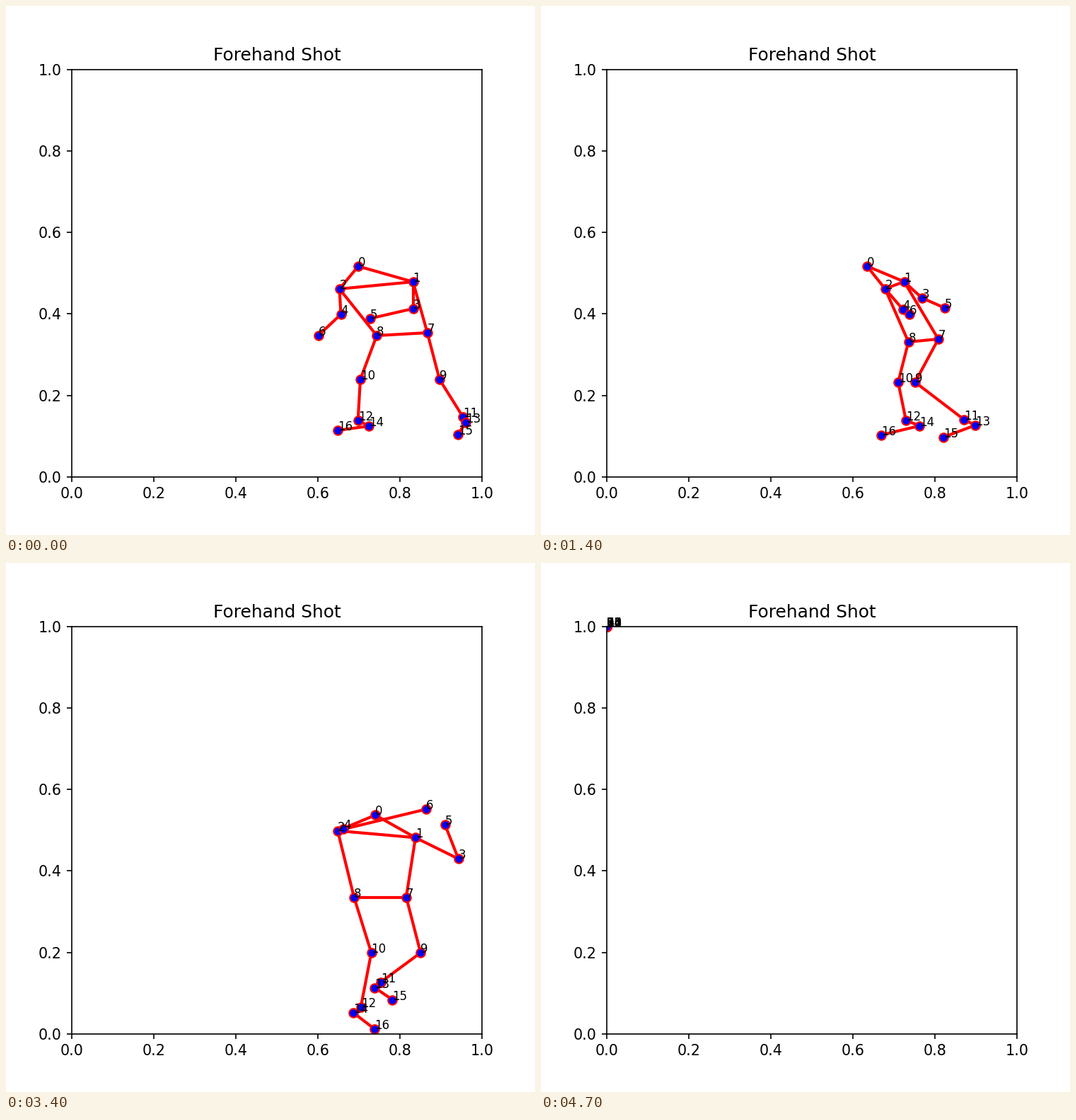
A matplotlib script for the animation above (6100 ms loop, 748 by 748 pixels).

```python
import numpy as np
import matplotlib.pyplot as plt
from matplotlib.animation import FuncAnimation

SIZE = 748
STEPS, STEP_MS = 61, 100
LOST_STEP = 47  # from here on every joint rests in the top-left corner
MOMENTS = np.array([0, 5, 14, 22, 29, 39])  # key moments of the stroke
BONES = [(0, 1), (0, 2), (1, 2), (1, 3), (3, 5), (2, 4), (4, 6),
         (1, 7), (2, 8), (7, 8), (7, 9), (9, 11), (11, 13), (13, 15),
         (8, 10), (10, 12), (12, 14), (14, 16)]
t = np.arange(LOST_STEP)


def ease(start, end):
    u = np.clip((t - start) / (end - start), 0, 1)
    return u * u * (3 - 2 * u)


def bump(center, width):
    return np.exp(-0.5 * ((t - center) / width) ** 2)


def track(*values):
    """Smooth curve through one value per key moment, then held."""
    values = np.array(values)
    slopes = np.gradient(values, MOMENTS)
    now = np.minimum(t, MOMENTS[-1])
    i = np.clip(np.searchsorted(MOMENTS, now, side="right") - 1, 0, len(MOMENTS) - 2)
    span = MOMENTS[i + 1] - MOMENTS[i]
    u = (now - MOMENTS[i]) / span
    blend = u * u * (3 - 2 * u)
    return (values[i] * (1 - blend) + values[i + 1] * blend
            + span * u * (1 - u) * (slopes[i] * (1 - u) - slopes[i + 1] * u))


def pair(center, width, tilt):
    """Right and left joint on either side of a center."""
    half = (width - 1j * tilt) / 2
    return center + half, center - half


def foot(heel, reach, drop):
    """Ankle, heel and toe; the toe lies reach across and drop below the heel."""
    return heel + 0.35 * reach - 8j, heel, heel + reach + 1j * drop


def stroke():
    """Stage position of all 17 joints as x + iy, one row per step."""
    width = track(104, 64, 27, 107, 124, 87)
    chest = 524 - 24 * bump(14, 5) + 1j * (395 - 19 * bump(29, 5))
    hips = (560 - 31 * ease(0, 24)
            + 1j * (473 - 9 * bump(0, 4) - 8 * bump(29, 4) + 10 * ease(31, 39)))
    nose = chest - 25 - 15 * bump(16, 6) + 35 * ease(26, 39) - 27j
    shoulder_r, shoulder_l = pair(chest, width, 10 - 25 * ease(22, 39))
    hip_r, hip_l = pair(hips, 32 + 0.38 * width, 4 - 4 * ease(14, 22))

    elbow_r = (shoulder_r + 25 * ease(0, 13) + 44 * ease(21, 39)
               + 1j * (38 - 18 * bump(17, 5) - 8 * ease(24, 30)))
    elbow_l = shoulder_l + track(2 + 36j, 40j, 25 + 29j, -15 + 42j, -31 + 9j, 64 - 9j)
    hand_r = elbow_r + track(-61 + 14j, -45 + 22j, 32 + 14j, -48 + 7j, -27 - 45j, -13 - 39j)
    hand_l = elbow_l + track(-32 + 30j, -51 + 32j, 9 + 7j, -60 + 25j, 113 - 34j, 80 - 6j)

    knee_y = 528 + 0.02 * t**2
    knee_r = track(613, 611, 529, 530, 550, 630) + 1j * knee_y
    knee_l = track(501, 508, 505, 469, 485, 555) + 1j * knee_y
    heel_r = track(650, 669, 614, 545, 538, 501) + 1j * (589 + 28 * bump(26, 6))
    heel_l = (track(513, 528, 535, 530, 493, 498)
              + 1j * (594 - 12 * bump(22, 3) + 53 * ease(22, 39)))
    ankle_r, heel_r, toe_r = foot(heel_r, -11 - 41 * bump(17, 5) + 72 * ease(29, 39), 17)
    ankle_l, heel_l, toe_l = foot(heel_l, -42 - 13 * bump(12, 6) + 97 * ease(24, 39), 6 + 0.5 * t)

    joints = np.stack([nose, shoulder_r, shoulder_l, elbow_r, elbow_l, hand_r, hand_l,
                       hip_r, hip_l, knee_r, knee_l, ankle_r, ankle_l,
                       heel_r, heel_l, toe_r, toe_l], axis=1)
    follow_through = 36 * ease(38, 50)
    return joints + follow_through[:, None]


fig, ax = plt.subplots(figsize=(5, 5), dpi=SIZE / 5)
fig.subplots_adjust(left=0.1243, right=0.8995, bottom=0.11, top=0.88)
ax.set(xlim=(0, 1), ylim=(0, 1))
ax.set_title("Forehand Shot")

stage = stroke()
box = ax.get_position()
paths = np.stack([(stage.real / SIZE - box.x0) / box.width,
                  (1 - stage.imag / SIZE - box.y0) / box.height], axis=-1)
corner = np.tile([0.0, 1.0], (17, 1))

bones = [ax.plot([], [], color="red", lw=2)[0] for _ in BONES]
dots, = ax.plot([], [], "o", ms=6, mfc="blue", mec="red", zorder=2.2)
labels = [ax.text(0, 1, str(n), fontsize=8) for n in range(17)]


def draw(step):
    joints = paths[step] if step < LOST_STEP else corner
    for line, (a, b) in zip(bones, BONES):
        line.set_data(joints[[a, b], 0], joints[[a, b], 1])
    dots.set_data(joints[:, 0], joints[:, 1])
    for label, joint in zip(labels, joints):
        label.set_position(joint)
    return [*bones, dots, *labels]


anim = FuncAnimation(fig, draw, frames=STEPS, interval=STEP_MS,
                     repeat=True, repeat_delay=0)
plt.show()
```
